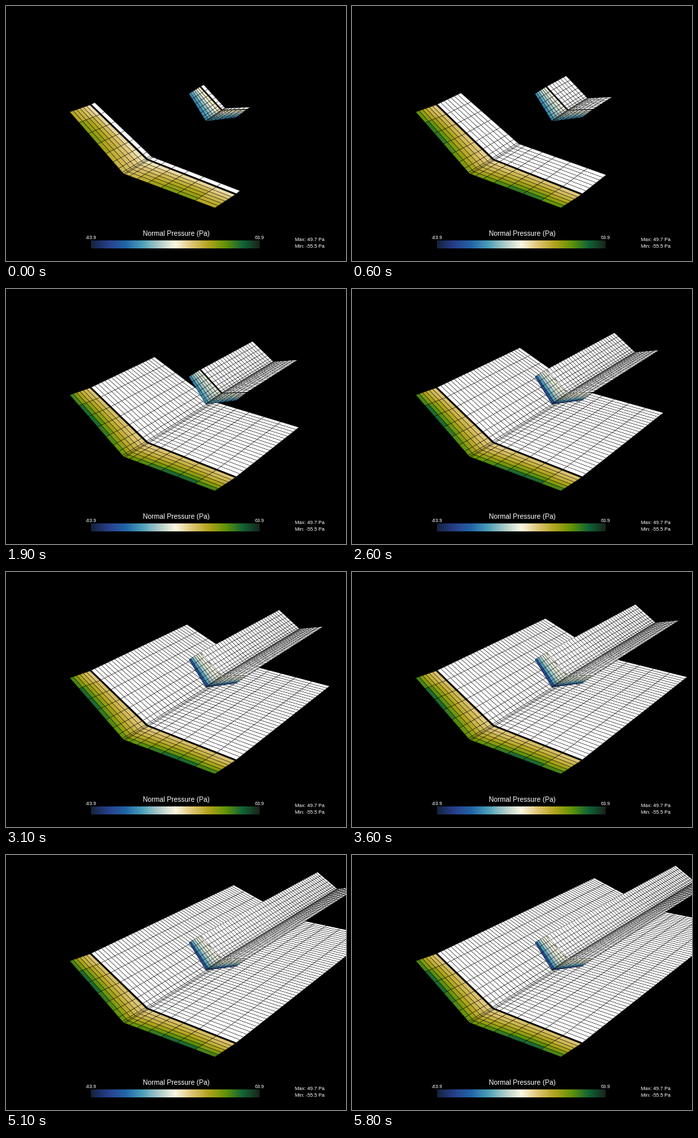
Write a matplotlib script that moves like this. It is 512x384 px and loops after 5900 ms.

```python
import numpy as np
import matplotlib.pyplot as plt
from matplotlib.animation import FuncAnimation
from matplotlib.collections import PolyCollection
from matplotlib.colors import LinearSegmentedColormap

W, H, DPI = 512, 384, 64
FRAMES, STEP_MS = 59, 100
PX = 72 / DPI                       # points per pixel
CHORD, SPAN = 6, 8                  # panels per half wing
VANISH = np.array([1118, -326, 1])  # where all streamwise lines meet
GAP = 0.4                           # wing to wake, in wake steps

CMAP = LinearSegmentedColormap.from_list("pressure", [
    "#14233f", "#273f8a", "#2164a7", "#4b9fb8", "#aac9c8", "#fbf8e2",
    "#dec472", "#b1a41c", "#629308", "#116436", "#17251a"])

# span stations from root to tip, crowded at the root
STATIONS = 1 - np.cos(np.linspace(0, np.pi / 2, SPAN + 1))
MIDDLE = (STATIONS[1:] + STATIONS[:-1]) / 2
OUT = np.concatenate([MIDDLE[::-1], MIDDLE])
BACK = (np.arange(CHORD) + 0.5) / CHORD


def lift(points, depth):
    """Screen points with depth as homogeneous rows."""
    p, d = np.array(points, float), np.array(depth, float)[:, None]
    return np.hstack([p * d, d])


def spread(ends):
    """Points from the left tip over the root to the right tip."""
    left, root, right = ends
    t = STATIONS[:, None]
    return np.vstack([(root + (left - root) * t)[:0:-1], root + (right - root) * t])


def quads(rows):
    """Project rows of homogeneous points and join them into panels."""
    g = rows[..., :2] / rows[..., 2:]
    q = np.stack([g[:-1, :-1], g[:-1, 1:], g[1:, 1:], g[1:, :-1]], axis=2)
    return q.reshape(-1, 4, 2)


class Plane:
    def __init__(self, ax, lead, tail, depth, z):
        start = spread(lift(tail, depth))
        front = spread(lift(lead, np.array(depth) - CHORD))
        back = start - GAP * VANISH
        u = np.linspace(0, 1, CHORD + 1)[:, None, None]
        m = np.arange(FRAMES + 1)[:, None, None]
        self.panels = quads(start + m * VANISH)
        # neighbours share an edge, so each line is drawn twice
        style = dict(edgecolors="black", linewidths=0.36 * PX)
        self.wake = PolyCollection([], facecolors="white", zorder=z, **style)
        self.wing = PolyCollection(quads(front + u * (back - front)),
                                   cmap=CMAP, zorder=z + 1, **style)
        self.wing.set_clim(-1, 1)
        for c in (self.wake, self.wing):
            ax.add_collection(c)

    def show(self, n, pressure):
        self.wake.set_verts(self.panels[:(n + 1) * 2 * SPAN])
        self.wing.set_array(pressure.ravel())


def load(chord, root):
    """Chordwise profile scaled along the span, weaker at root and tip."""
    return np.outer(chord, root + (1 - root) * np.sin(np.pi * OUT ** 1.5))


FIRST_START = load(0.56 * (1 - BACK) ** 0.55, 0.5)
FIRST_END = load(0.88 * np.exp(-1.4 * BACK), 0.72)
SECOND_START = load(0.68 * BACK - 0.55, 0.9)
SECOND_MID = load(-0.6 * np.exp(-2.4 * BACK), 0.9)
SECOND_END = load(-1.05 * np.exp(-3.8 * BACK), 0.9)


def mix(a, b, k):
    return a + (b - a) * k


fig = plt.figure(figsize=(W / DPI, H / DPI), dpi=DPI, facecolor="black")
ax = fig.add_axes([0, 0, 1, 1])
ax.axis("off")
ax.imshow(np.linspace(0, 1, 254)[None], cmap=CMAP, aspect="auto",
          extent=(128, 382, 365, 353), vmin=0, vmax=1)
ax.set_xlim(0, W)
ax.set_ylim(H, 0)


def label(x, y, text, size, ha="center"):
    ax.text(x, y, text, color="white", fontsize=size * PX, ha=ha,
            va="center_baseline", family="Liberation Sans")


label(256, 341.5, "Normal Pressure (Pa)", 10.4)
label(128, 348.5, "-63.9", 7.3)
label(381.5, 348.5, "63.9", 7.3)
label(435, 351, "Max: 49.7 Pa", 7.5, "left")
label(435, 361, "Min: -55.5 Pa", 7.5, "left")

# left tip, root, right tip
first = Plane(ax, [(96, 159.5), (177, 252.5), (314.5, 304)],
              [(128.5, 148), (214, 230.5), (347, 282.5)], [188, 163, 144], 2)
second = Plane(ax, [(275.5, 132), (301, 173.5), (347, 167.5)],
               [(293.5, 121), (326, 156.5), (363.5, 155)], [192, 186, 180], 4)


def draw(n):
    settle = 1 - np.exp(-n / 4)
    hit = np.clip((n - 19) / 6, 0, 1)   # first wake passes the second wing
    first.show(n, mix(FIRST_START, FIRST_END, settle))
    second.show(n, mix(mix(SECOND_START, SECOND_MID, settle), SECOND_END, hit))
    return first.wake, first.wing, second.wake, second.wing


anim = FuncAnimation(fig, draw, frames=FRAMES, interval=STEP_MS,
                     init_func=lambda: draw(0), repeat=True, repeat_delay=0)
plt.show()
```
